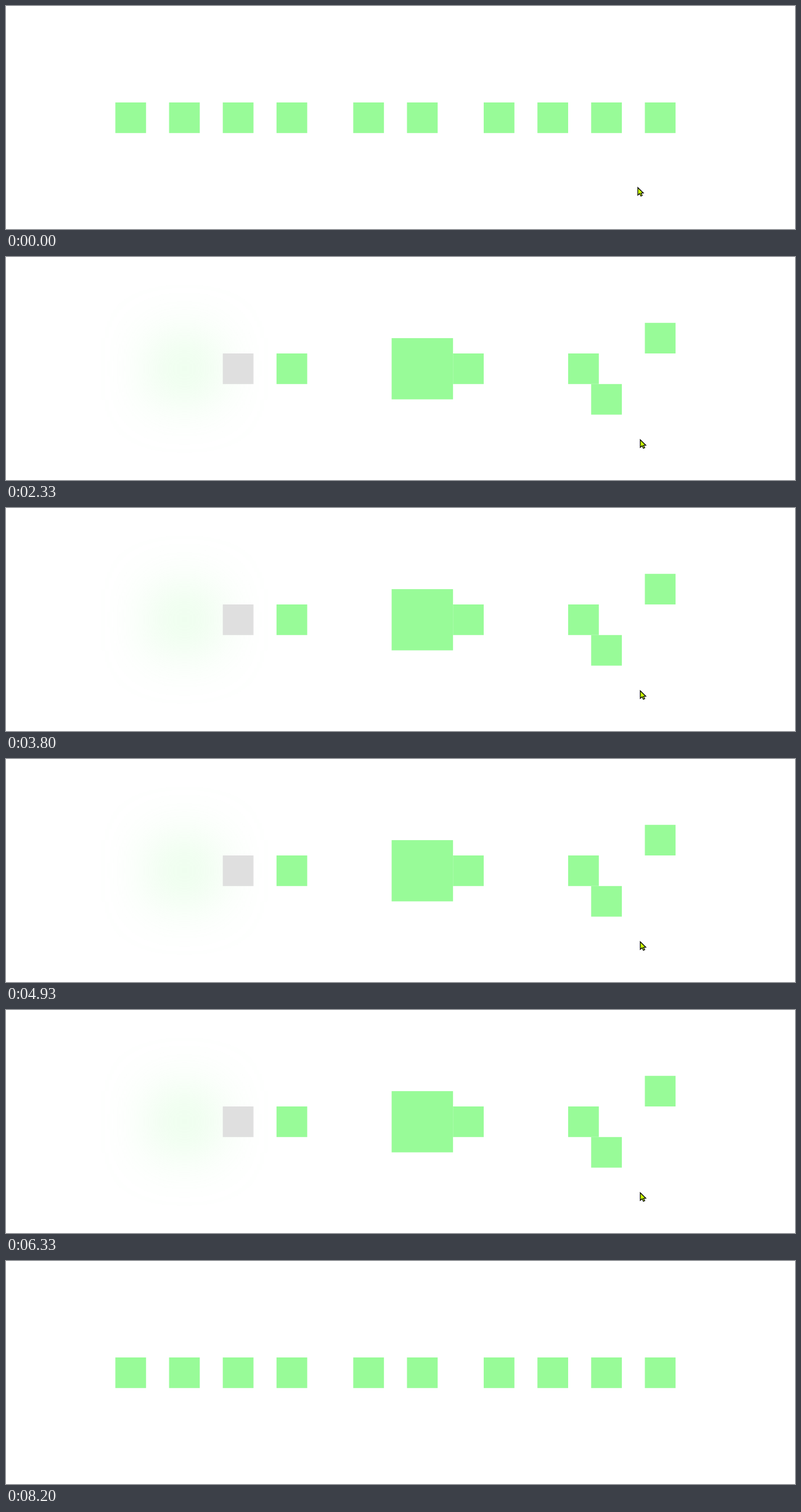
Animation, 1280 px wide and 363 px high, one loop 8.99 s. Source, as an HTML page with a canvas:

```html
<!DOCTYPE html>
<html lang="en">
<head>
<meta charset="utf-8">
<title>Entrance effects</title>
<style>
  html, body { margin: 0; width: 100%; height: 100%; overflow: hidden; background: #fff; }
  canvas { display: block; }
</style>
</head>
<body>
<canvas id="stage" width="1280" height="363"></canvas>
<script>
const ctx = document.getElementById('stage').getContext('2d');
const LOOP = 8990, FPS = 15;
const SIZE = 49.8, LEFT = 177.4, TOP = 157, PITCH = 87.15, GAP = 37.35;
const GREEN = [152, 251, 152], GREY = 223;

// Each run, in ticks: reset, first moving tick, rest.
const RUNS = [
  [17, 19, 27], [35, 37, 44], [57, 59, 65],
  [74, 75, 82], [95, 96, 104], [114, 115, 123]
];

// Pointer position by tick: tick, x, y.
const POINTER = [
  [0, 1025, 296], [21, 1025, 296], [24, 1029, 298], [113, 1029, 298],
  [114, 1030, 299], [118, 1030, 299], [123, 1042, 370]
];
const ARROW = new Path2D('M0 0V12.5L3 9.8L5 14L7.2 13L5.3 9H9Z');

// Effects take q, which falls from 1 at reset to 0 at rest.
const slide = (dx, dy) => q => ({ x: dx * q * SIZE, y: dy * q * SIZE });
const EFFECTS = [
  q => ({ alpha: 1 - q }),
  q => ({ blur: 50 * q }),
  q => ({ grey: q }),
  () => ({}),
  q => ({ scale: 1 - q }),
  q => ({ scale: 1 + q }),
  slide(-1, 0), slide(1, 0), slide(0, 1), slide(0, -1)
];

const mix = (a, b, p) => a + (b - a) * p;

// cubic-bezier(.25, .1, .25, 1)
function ease(t) {
  const curve = (a, b, u) => 3 * a * u * (1 - u) ** 2 + 3 * b * u * u * (1 - u) + u ** 3;
  let lo = 0, hi = 1;
  for (let i = 0; i < 24; i++) {
    const mid = (lo + hi) / 2;
    if (curve(.25, .25, mid) < t) lo = mid; else hi = mid;
  }
  return curve(.1, 1, lo);
}

function remaining(tick) {
  const run = RUNS.find(r => tick >= r[0] && tick < r[2]);
  if (!run) return 0;
  const [, move, end] = run;
  return 1 - ease(Math.max(0, (tick - move + 1) / (end - move + 1)));
}

function drawSquare(i, q) {
  const { x = 0, y = 0, scale = 1, alpha = 1, blur = 0, grey = 0 } = EFFECTS[i](q);
  const gaps = (i > 3) + (i > 5);
  const side = SIZE * scale, inset = (SIZE - side) / 2;
  ctx.save();
  ctx.globalAlpha = alpha;
  if (blur > 0.01) ctx.filter = `blur(${blur}px)`;
  ctx.fillStyle = `rgb(${GREEN.map(c => Math.round(mix(c, GREY, grey)))})`;
  ctx.fillRect(LEFT + i * PITCH + gaps * GAP + x + inset, TOP + y + inset, side, side);
  ctx.restore();
}

function drawPointer(tick) {
  const k = POINTER.findIndex(p => p[0] > tick);
  if (k < 0) return;
  const [t0, x0, y0] = POINTER[k - 1], [t1, x1, y1] = POINTER[k];
  const p = (tick - t0) / (t1 - t0);
  ctx.save();
  ctx.translate(Math.round(mix(x0, x1, p)), Math.round(mix(y0, y1, p)) - .5);
  ctx.fillStyle = '#cf0';
  ctx.strokeStyle = '#000';
  ctx.lineWidth = 1.2;
  ctx.fill(ARROW);
  ctx.stroke(ARROW);
  ctx.restore();
}

let shown = -1;
function render(now) {
  const tick = Math.floor((now % LOOP + 4) * FPS / 1000);
  if (tick !== shown) {
    shown = tick;
    ctx.fillStyle = '#fff';
    ctx.fillRect(0, 0, 1280, 363);
    const q = remaining(tick);
    EFFECTS.forEach((_, i) => drawSquare(i, q));
    drawPointer(tick);
  }
}

const start = performance.now();
(function loop() {
  render(performance.now() - start);
  requestAnimationFrame(loop);
})();
</script>
</body>
</html>
```
